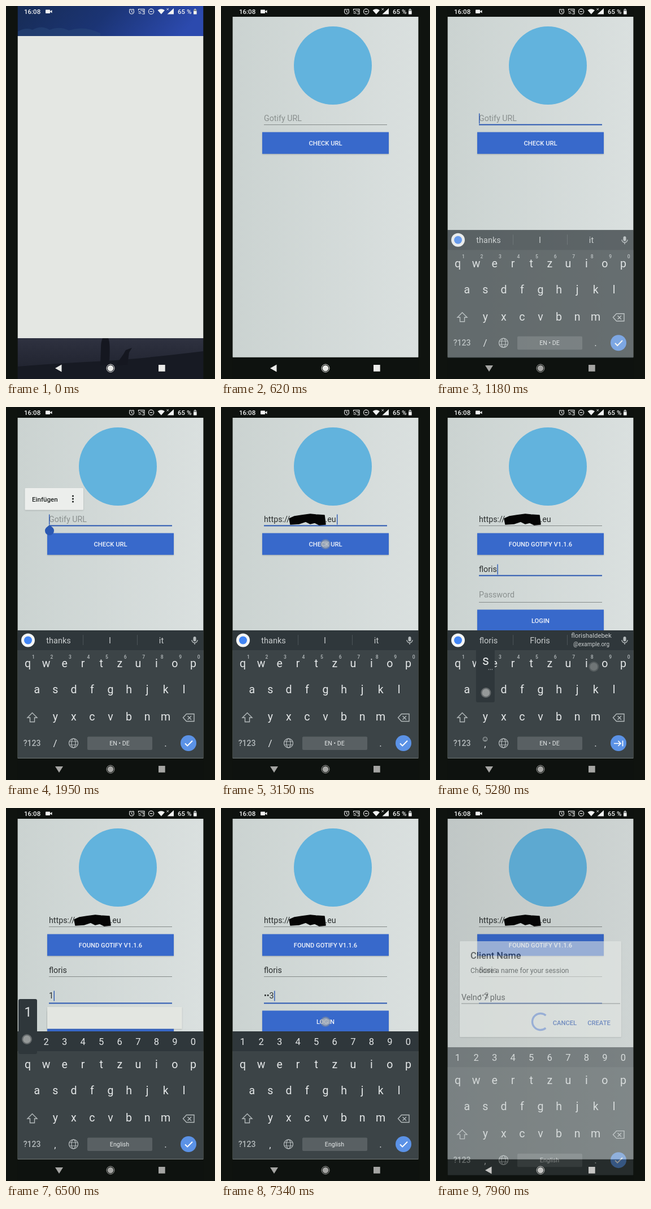
Animation, 370 px wide and 658 px high, one loop 8000 ms. Source, as an HTML page:

```html
<!DOCTYPE html>
<html lang="de">
<head>
<meta charset="utf-8">
<title>App login</title>
<style>
  html, body { margin: 0; width: 100%; height: 100%; overflow: hidden; background: #0f130f; }
  svg { display: block; width: 370px; height: 658px; font-family: Roboto, sans-serif; }
  text { white-space: pre; }
</style>
</head>
<body>
<svg id="stage" viewBox="0 0 370 658">
  <defs>
    <linearGradient id="paper"><stop stop-color="#cbd3d1"/><stop offset="1" stop-color="#dae0df"/></linearGradient>
    <linearGradient id="sky" x2="1" y2=".15"><stop stop-color="#172c55"/><stop offset=".5" stop-color="#1b3474"/><stop offset="1" stop-color="#2c4aae"/></linearGradient>
    <linearGradient id="dusk" x2="0" y2="1"><stop stop-color="#303342"/><stop offset="1" stop-color="#1c1f2a"/></linearGradient>
    <filter id="shadow" x="-10%" y="-20%" width="120%" height="150%"><feDropShadow dx="0" dy="1" stdDeviation="1.3" flood-opacity=".2"/></filter>
  </defs>
</svg>
<script>
const LOOP = 8000, DIALOG = 7860, NAME = 'floris', BLUE = '#3869cb', FOCUS = '#2b58b2', STRIP = '#2f373b';
const stage = document.getElementById('stage');
const updates = [];
const clamp = v => Math.max(0, Math.min(1, v));
const ease = p => 1 - (1 - p) ** 3;

function add(parent, tag, attrs = {}, text) {
  const el = document.createElementNS('http://www.w3.org/2000/svg', tag);
  for (const k in attrs) if (attrs[k] !== undefined) el.setAttribute(k, attrs[k]);
  if (text !== undefined) el.textContent = text;
  return parent.appendChild(el);
}
const group = (parent, attrs) => add(parent, 'g', attrs);
const rect = (p, x, y, width, height, fill, more) => add(p, 'rect', { x, y, width, height, fill, ...more });
const disc = (p, cx, cy, r, fill, more) => add(p, 'circle', { cx, cy, r, fill, ...more });
const path = (p, d, fill, more) => add(p, 'path', { d, fill, ...more });
const line = (p, d, stroke, width = 1.4) => path(p, d, 'none', { stroke, 'stroke-width': width });
const label = (p, x, y, size, fill, text, more) => add(p, 'text', { x, y, 'font-size': size, fill, ...more }, text);
const mid = (p, x, y, size, fill, text, more) => label(p, x, y, size, fill, text, { 'text-anchor': 'middle', ...more });
const MEDIUM = { 'font-weight': 500 };

// Visible from a to b, with optional fade lengths.
function show(el, a, b = LOOP + 1, fadeIn = 0, fadeOut = 0) {
  updates.push(t => {
    let o = t >= a && t < b + fadeOut ? 1 : 0;
    if (o && fadeIn) o = clamp((t - a) / fadeIn);
    if (o && t > b) o = clamp(1 - (t - b) / fadeOut);
    el.setAttribute('opacity', o);
    el.style.display = o ? '' : 'none';
  });
  return el;
}

// Home screen and launching window
const home = show(group(stage), 0, 420);
rect(home, 20.5, 0, 329, 56, 'url(#sky)');
path(home, 'M21 53V45q14-8 26-3q16-9 30 0q18-7 34 1q28-9 56 5V53z', '#2a4a7c', { opacity: .5 });
rect(home, 20.5, 580, 329, 78, 'url(#dusk)');
path(home, 'M20.5 636Q95 630 160 627T349.5 609V658H20.5z', '#171a23');
path(home, 'M168 604q0-12 3-18h10q4 8 2 40l1 8H167zM194 634l14-20 4-7 11-4-5 8-3 22z', '#151720');
const bars = group(stage);
rect(bars, 20.5, 0, 329, 60, '#0e120f');
rect(bars, 20.5, 575, 329, 83, '#0e120f');
const splash = rect(stage, 20.5, 53, 329, 533, '#e4e7e3');
updates.push(t => {
  const p = ease(clamp((t - 70) / 260));
  bars.setAttribute('opacity', p);
  splash.setAttribute('y', 53 - 34 * p);
  splash.setAttribute('height', 533 + 67.5 * p);
});

// Login page
const page = show(group(stage), 420, LOOP + 1, 170);
rect(page, 20.5, 19, 329, 600.5, 'url(#paper)');
disc(page, 198, 105, 69, '#62b3dd');

function button(parent, y, text) {
  const g = group(parent);
  rect(g, 73, y, 224, 38.3, BLUE, { filter: 'url(#shadow)' });
  mid(g, 185, y + 23.3, 11.2, '#f0f3fa', text, MEDIUM);
  return g;
}
function spinner(cy) {
  const arc = disc(page, 185, cy, 14.5, 'none', { stroke: BLUE, 'stroke-width': 3.4, pathLength: 360 });
  updates.push(t => {
    const sweep = 150 + 110 * Math.cos((t - 7960) / 210);
    arc.setAttribute('stroke-dasharray', `${sweep} ${360 - sweep}`);
    arc.setAttribute('transform', `rotate(${50 + (t - 7960) * .27} 185 ${cy})`);
  });
  return arc;
}
// A text field; y is its baseline, base its underline, value(t) its content.
function field(parent, y, base, hint, value, from, to) {
  const g = group(parent);
  const hintText = label(g, 76, y, 14.25, '#8a908f', hint);
  const text = label(g, 76, y, 14.25, '#2b2f2f', '');
  const rule = rect(g, 76, base, 218, 1, '#858b8a');
  const caret = rect(g, 76, y - 13.5, 1.4, 18, FOCUS);
  updates.push(t => {
    const v = value(t), on = t >= from && t < to;
    text.textContent = v.replace('~', '');
    hintText.style.display = v ? 'none' : '';
    rule.setAttribute('y', on ? base - .6 : base);
    rule.setAttribute('height', on ? 2 : 1);
    rule.setAttribute('fill', on ? FOCUS : '#858b8a');
    caret.style.display = on && t < DIALOG ? '' : 'none';
    caret.setAttribute('x', v.endsWith('~') ? 205 : 76 + (v ? text.getComputedTextLength() + .5 : 0));
  });
}

// Key presses: character, time down, time up
const presses = [
  ['f', 4380, 4480], ['l', 4540, 4640], ['o', 4690, 4790], ['r', 4840, 4940], ['i', 5050, 5250], ['s', 5210, 5360],
  ['1', 6480, 6600], ['2', 6760, 6880], ['3', 7060, 7180]
];
const typed = (t, digits) => presses.filter(([c, down]) => down <= t && /\d/.test(c) === digits).map(k => k[0]).join('');
const dots = s => '•'.repeat(Math.max(0, s.length - 1)) + s.slice(-1);

field(page, 203, 209, 'Gotify URL', t => t < 2540 ? '' : 'https://~', 960, 3700);
const pasted = show(group(page), 2540);
label(pasted, 184.5, 203, 14.25, '#2b2f2f', '.eu');
path(pasted, 'M121 197L130 193 143 191 158 189 168 190 183 191 185 207 174 208 166 204 158 206 150 202 138 206 123 207z', '#050505', { stroke: '#050505', 'stroke-width': 1.5, 'stroke-linejoin': 'round' });
show(button(page, 222.5, 'CHECK URL'), 0, 3210);
show(spinner(242), 3210, 3460);
show(button(page, 222.5, 'FOUND GOTIFY V1.1.6'), 3460);

const account = show(group(page), 3460);
field(account, 291, 297, 'Username', t => typed(t, false), 3700, 5750);
field(account, 336, 344, 'Password', t => dots(typed(t, true)), 5750, LOOP);
show(button(account, 357.5, 'LOGIN'), 0, 7470);
show(spinner(377), 7470);

// Text handle, paste menu and autofill hints
const handle = show(group(stage), 1740, 2540);
path(handle, 'M77 208L83 213A8 8 0 1 1 71 213z', FOCUS);
const paste = show(group(stage), 1740, 2540, 150, 120);
rect(paste, 33.5, 143, 103.5, 38.5, '#eceeec', { rx: 1.5, filter: 'url(#shadow)' });
label(paste, 46, 166.5, 11.6, '#202423', 'Einfügen', MEDIUM);
[157, 162, 167].forEach(y => disc(paste, 118.5, y, 1.6, '#202423'));

// The content goes first, then the empty box.
function autofill(y, a, b) {
  const g = show(group(stage), a, b + 60, 80, 60);
  rect(g, 73, y, 238.5, 38.5, '#e3e6e1', { filter: 'url(#shadow)' });
  const body = show(group(g), a + 90, b);
  rect(body, 73, y, 238.5, 38.5, '#dde1e9');
  label(body, 86, y + 23.5, 12.8, '#747b80', 'Mit Keepass2Android ausfüllen');
  disc(body, 287.5, y + 19, 11.3, '#2f8c4e');
}
autofill(305, 3840, 4380);
autofill(351, 6150, 6480);

// Session dialog
const dim = rect(stage, 20.5, 19, 329, 600, '#000');
updates.push(t => dim.setAttribute('opacity', clamp((t - DIALOG) / 180) * .1));
const dialog = show(group(stage), DIALOG, LOOP + 1, 180);
rect(dialog, 42, 235, 286, 169, '#e6eae7', { rx: 1.5, filter: 'url(#shadow)' });
label(dialog, 61, 266, 16.3, '#15191a', 'Client Name', MEDIUM);
label(dialog, 61, 291, 12.2, '#2b3031', 'Choose a name for your session');
label(dialog, 45, 339, 14.25, '#25292a', 'Velno 7 plus');
rect(dialog, 45, 344.5, 281, 1, '#666c6d');
mid(dialog, 228, 383, 11.2, '#2c57b4', 'CANCEL', MEDIUM);
mid(dialog, 288.5, 383, 11.2, '#2c57b4', 'CREATE', MEDIUM);

// Keyboard
const board = show(group(stage), 1000, 7900, 250, 130);
updates.push(t => {
  const y = 60 * (1 - ease(clamp((t - 1000) / 250))) + 60 * clamp((t - 7900) / 130);
  board.setAttribute('transform', `translate(0 ${y})`);
});
const INK = '#e4e7e8', SOFT = '#b4babc';
rect(board, 20.5, 394, 329, 225.5, '#3c4447');
rect(board, 20.5, 394, 329, 35, STRIP);

const keys = {};
function row(parent, chars, x0, y) {
  [...chars].forEach((c, i) => {
    const x = x0 + 32.55 * i;
    keys[c] = [x, y];
    mid(parent, x, y + 6.3, c > '9' ? 19.5 : 16.5, INK, c);
  });
}
const words = show(group(board), 0, 5850), digits = show(group(board), 5850);
row(digits, '1234567890', 38.5, 412);
row(board, 'qwertzuiop', 38.5, 453);
row(board, 'asdfghjkl', 54.8, 499);
row(board, 'yxcvbnm', 87.3, 547);
[...'1234567890'].forEach((c, i) => mid(words, 48.3 + 32.55 * i, 443.5, 8.5, SOFT, c, MEDIUM));

disc(words, 39, 411.5, 12, '#f4f5f5');
disc(words, 39, 411.5, 7, '#4285f4');
line(words, 'M136.5 402V420M232.5 402V420', '#4b5357', 1);
const picks = [93, 184, 275].map(x => mid(words, x, 417, 14.5, '#c9cdce', ''));
const mail = [
  mid(words, 275, 407, 11.4, '#c9cdce', NAME + 'haldebek'),
  mid(words, 275, 422, 10, '#c9cdce', '@example.org')
];
mail.forEach(el => show(el, 4380));
updates.push(t => {
  const s = typed(t, false);
  const list = s ? [s, s[0].toUpperCase() + s.slice(1), ''] : ['thanks', 'I', 'it'];
  picks.forEach((el, i) => el.textContent = list[i]);
});
rect(words, 331.5, 405, 5, 8.5, SOFT, { rx: 2.5 });
line(words, 'M329 411a5 5 0 0 0 10 0M334 416V419', SOFT);

line(board, 'M46.5 539.5L55 548H50.5V555.5H42.5V548H38z', SOFT);
line(board, 'M319.5 541.5H333V554.5H319.5L313.5 548zM321.5 545L328 551.5M328 545L321.5 551.5', SOFT);
mid(board, 46, 598, 14, SOFT, '?123', MEDIUM);
disc(board, 119.5, 593, 8, 'none', { stroke: SOFT, 'stroke-width': 1.3 });
add(board, 'ellipse', { cx: 119.5, cy: 593, rx: 3.6, ry: 8, fill: 'none', stroke: SOFT, 'stroke-width': 1.2 });
line(board, 'M112 590H127M112 596H127', SOFT, 1.2);
rect(board, 144, 581.5, 115, 23.5, '#596063', { rx: 2 });
show(mid(board, 201, 597, 10.6, INK, 'EN • DE'), 0, 5850);
show(mid(board, 201, 597, 10.6, INK, 'English'), 5850);
show(mid(board, 87, 599, 17, INK, '/'), 0, 3720);
show(mid(board, 87, 600, 17, INK, ','), 3720);
const smile = show(group(board), 3720, 5850);
disc(smile, 87, 586, 3.8, 'none', { stroke: SOFT, 'stroke-width': .9 });
line(smile, 'M85 587a2.2 2.2 0 0 0 4 0M85.6 584.2v1M88.4 584.2v1', SOFT, .9);
mid(board, 282.5, 599, 17, INK, '.');
disc(board, 323, 593, 14, '#5b92e6');
const tick = 'M317 593.5L321.2 597.7L330 588.8';
show(line(board, tick, '#fff', 2), 0, 3720);
show(line(board, 'M315 593.5H327M322.5 589L327 593.5L322.5 598M330.5 588.5V598.5', '#fff', 1.7), 3720, 5850);
show(line(board, tick, '#fff', 2), 5850);

// Key previews
presses.forEach(([c, down, up], i) => {
  const [x, y] = keys[c], next = presses[i + 1];
  const g = show(group(board), down, next ? Math.min(up, next[1]) : up);
  rect(g, x - 16.5, y - 75, 33, 97, STRIP, { rx: 3 });
  mid(g, x + .5, y - 44, 23, INK, c);
  if (c === 's') [6, 9, 12].forEach(d => disc(g, x + d, y - 36, .8, SOFT));
});

// Status and navigation icons
const WHITE = '#f1f2f2';
rect(stage, 0, 0, 20.5, 658, '#0f130f');
rect(stage, 349.5, 0, 20.5, 658, '#0f130f');
const status = group(stage);
label(status, 32, 14, 11.5, WHITE, '16:08', MEDIUM);
rect(status, 70, 6.5, 8, 6.5, WHITE, { rx: .8 });
path(status, 'M78 9.5L81.5 7V12.5L78 10z', WHITE);
disc(status, 222.5, 10, 4, 'none', { stroke: WHITE, 'stroke-width': 1.1 });
line(status, 'M222.5 7.5V10.5L224.5 11.5M217.8 7L220.3 5M227.2 7L224.7 5', WHITE, 1);
line(status, 'M234.5 8V5.5H245V14H241M234.5 9.5a4.5 4.5 0 0 1 4.5 4.5M234.5 12a2 2 0 0 1 2 2M238 8H243V11.5', WHITE, 1.1);
disc(status, 257, 9.7, 4.6, 'none', { stroke: WHITE, 'stroke-width': 1.1 });
line(status, 'M254.7 9.7H259.3', WHITE, 1.2);
path(status, 'M268.5 7.5Q274.8 3 281 7.5L274.8 14.5z', WHITE);
path(status, 'M285.5 14.5H297V4z', WHITE);
line(status, 'M284.5 4L288 7.5M288 4L284.5 7.5', WHITE, .9);
label(status, 304, 14, 11.5, WHITE, '65 %', MEDIUM);
rect(status, 332, 6, 5.5, 8.5, '#8d9190', { rx: .6 });
path(status, 'M333.5 5H336V6H333.5zM332 9H337.5V14.5H332z', WHITE);

const nav = group(stage);
show(path(nav, 'M87 639L98.5 632.5V645.5z'), 0, 1050);
show(path(nav, 'M87 639L98.5 632.5V645.5z'), 7900);
show(path(nav, 'M87 634H101L94 645z'), 1050, 7900);
disc(nav, 185, 639, 5.3);
const ring = disc(nav, 185, 639, 6.9, 'none', { 'stroke-width': 1 });
rect(nav, 270, 633, 11.7, 11.7);
updates.push(t => {
  const shade = t < 1050 ? 235 : 165 + 70 * clamp((t - 7900) / 130);
  const color = `rgb(${shade},${shade},${shade - 2})`;
  nav.setAttribute('fill', color);
  ring.setAttribute('stroke', color);
});

// Finger marks: x, y, down, up
const touches = [
  [112, 200, 900, 980], [112, 200, 1320, 1750], [68, 162, 2210, 2540], [185, 242, 3080, 3200],
  [112, 286, 3640, 3720], [112, 331, 5680, 5760], [185, 377, 7330, 7430]
];
presses.forEach(([c, down, up]) => {
  const [x, y] = keys[c];
  touches.push(c > '9' ? [c === 'i' ? x + 13 : x + 1, y + 5, down, up] : [x - 1.5, y - 4, down, up]);
});
touches.forEach(([x, y, down, up]) => {
  const g = show(group(stage), down, up, 0, 70);
  disc(g, x, y, 9, '#8f9493', { 'fill-opacity': .55 });
  disc(g, x, y, 6.8, '#c6c9c8', { 'fill-opacity': .5 });
});

const start = performance.now();
function frame() {
  const t = (performance.now() - start) % LOOP;
  updates.forEach(f => f(t));
  requestAnimationFrame(frame);
}
frame();
</script>
</body>
</html>
```
